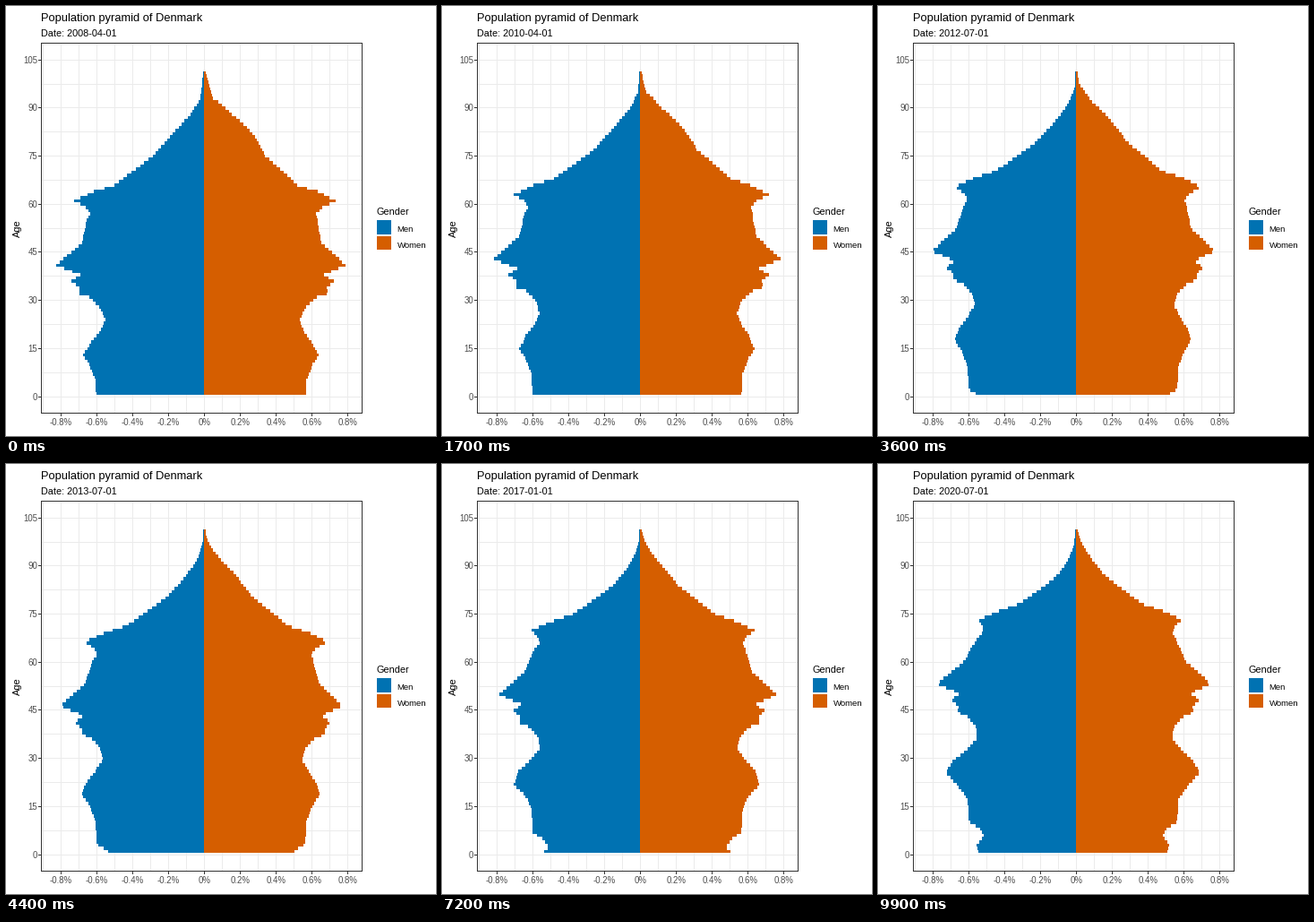
Animation, 480 px wide and 480 px high, one loop 10000 ms. Source, as a matplotlib script:

```python
import numpy as np
import matplotlib.pyplot as plt
from matplotlib.animation import FuncAnimation
from matplotlib.patches import Polygon, Rectangle

plt.rcParams["font.family"] = ["Liberation Sans", "DejaVu Sans"]

SIZE, DPI = 480, 100
FRAMES, INTERVAL = 100, 100
X0, PER_PCT = 221, 200         # pixel of 0 %, pixels per percent
Y0, PER_YEAR = 436.07, 3.58    # pixel of age 0, pixels per year
LEFT, RIGHT, TOP, BOTTOM = 39, 397, 41, 454
BLUE, ORANGE = "#0072B2", "#D55E00"
GRID, DARK, LABEL = "#EBEBEB", "#333333", "#4D4D4D"

# Turning points of the male cohorts: (age at the start, bar length).
# Negative ages are births still to come.
MEN = [
    (-12, 108), (-9, 111), (-6.5, 102), (-4, 108), (-2, 120), (5, 121),
    (10, 128), (13, 135), (17, 126), (20, 117), (24, 110), (28, 117),
    (31, 128), (32, 139), (34, 139), (36, 148), (38, 138), (41, 165),
    (48, 136), (55, 131), (57, 127), (59, 132), (61, 145), (64, 123),
    (66, 100), (70, 81), (75, 57), (82, 35), (88, 15), (93, 4), (101, 0.7),
]
# Women per man in the same cohort.
RATIO = [
    (-12, 0.94), (16, 0.95), (33, 0.99), (41, 0.96), (54, 0.965), (60, 1.01),
    (66, 1.04), (70, 1.1), (75, 1.2), (80, 1.42), (85, 1.75), (92, 2.5),
]
LONGER_LIFE = 3    # years by which female mortality lags

AGES = np.arange(1, 102)
EDGES = Y0 - PER_YEAR * np.append(AGES - 0.5, AGES[-1] + 0.5)


def along(points, x):
    return np.interp(x, *zip(*points))


def survival(age, lag):
    """Log size of a cohort: migration in youth, Gompertz mortality later."""
    arrivals = 0.09 * np.clip((age - 17) / 10, 0, 1)
    departures = 0.04 * np.clip((age - 32) / 15, 0, 1)
    return arrivals - departures - 1.95 * np.exp(0.09 * (age - lag - 90))


def bar_lengths(years, female):
    cohort = AGES - years
    lag = LONGER_LIFE if female else 0
    size = along(MEN, cohort) * (along(RATIO, cohort) if female else 1)
    size = size * np.exp(survival(AGES, lag) - survival(cohort, lag))
    return np.maximum(size, 0.7)


def outline(lengths, side):
    xs = X0 + side * np.repeat(lengths, 2)
    ys = np.repeat(EDGES, 2)[1:-1]
    return np.vstack([[X0, ys[0]], np.column_stack([xs, ys]), [X0, ys[-1]]])


fig = plt.figure(figsize=(SIZE / DPI, SIZE / DPI), dpi=DPI, facecolor="white")
ax = fig.add_axes([0, 0, 1, 1])
ax.set(xlim=(0, SIZE), ylim=(SIZE, 0))
ax.axis("off")


def box(x, y, w, h, color, z=1):
    ax.add_patch(Rectangle((x, y), w, h, fc=color, lw=0, antialiased=False, zorder=z))


def text(x, y, s, px, color="black", **kw):
    kw.setdefault("va", "baseline")
    return ax.text(x, y, s, fontsize=px * 72 / DPI, color=color, **kw)


def pyramid_side(color):
    shape = Polygon([[0, 0], [0, 1]], fc=color, lw=0, antialiased=False, zorder=3)
    return ax.add_patch(shape)


# Grid
for tenth in range(-9, 9):
    box(X0 + tenth * PER_PCT // 10, TOP, 1, BOTTOM - TOP, GRID)
for half in range(15):
    box(LEFT, int(Y0 - 7.5 * half * PER_YEAR), RIGHT - LEFT, 1, GRID)

# Panel border
for y in (TOP, BOTTOM):
    box(LEFT, y, RIGHT - LEFT + 1, 1, DARK, 4)
for x in (LEFT, RIGHT):
    box(x, TOP, 1, BOTTOM - TOP + 1, DARK, 4)

# Axis ticks and labels
for tenth in range(-8, 9, 2):
    x = X0 + tenth * PER_PCT // 10
    box(x, BOTTOM + 1, 1, 3, DARK)
    name = f"{tenth / 10:.1f}%" if tenth else "0%"
    text(x + 0.5, 468, name, 9.6, LABEL, ha="center")
for age in range(0, 106, 15):
    y = int(Y0 - age * PER_YEAR)
    box(LEFT - 3, y, 3, 1, DARK)
    text(35, y + 4, age, 9.6, LABEL, ha="right")
text(17.5, 248.5, "Age", 11, rotation=90, ha="right", va="center")

# Titles and legend
text(39, 17, "Population pyramid of Denmark", 12.9)
date = text(39, 34, "", 10.9)
text(414, 233, "Gender", 10.9)
for y, h, color, name in ((239, 16, BLUE, "Men"), (257, 15, ORANGE, "Women")):
    box(414, y, 16, h, color)
    text(436.5, y + 13, name, 9.5)

men, women = pyramid_side(BLUE), pyramid_side(ORANGE)


def update(i):
    # Each quarter is held for one step, followed by one step halfway to the next.
    quarters = max(0, (i - 1) / 2)
    men.set_xy(outline(bar_lengths(quarters / 4, False), -1))
    women.set_xy(outline(bar_lengths(quarters / 4, True), 1))
    year, q = divmod(int(quarters) + 1, 4)
    date.set_text(f"Date: {2008 + year}-{3 * q + 1:02d}-01")
    return men, women, date


anim = FuncAnimation(fig, update, frames=FRAMES, interval=INTERVAL,
                     repeat=True, repeat_delay=0, blit=False)
plt.show()
```
